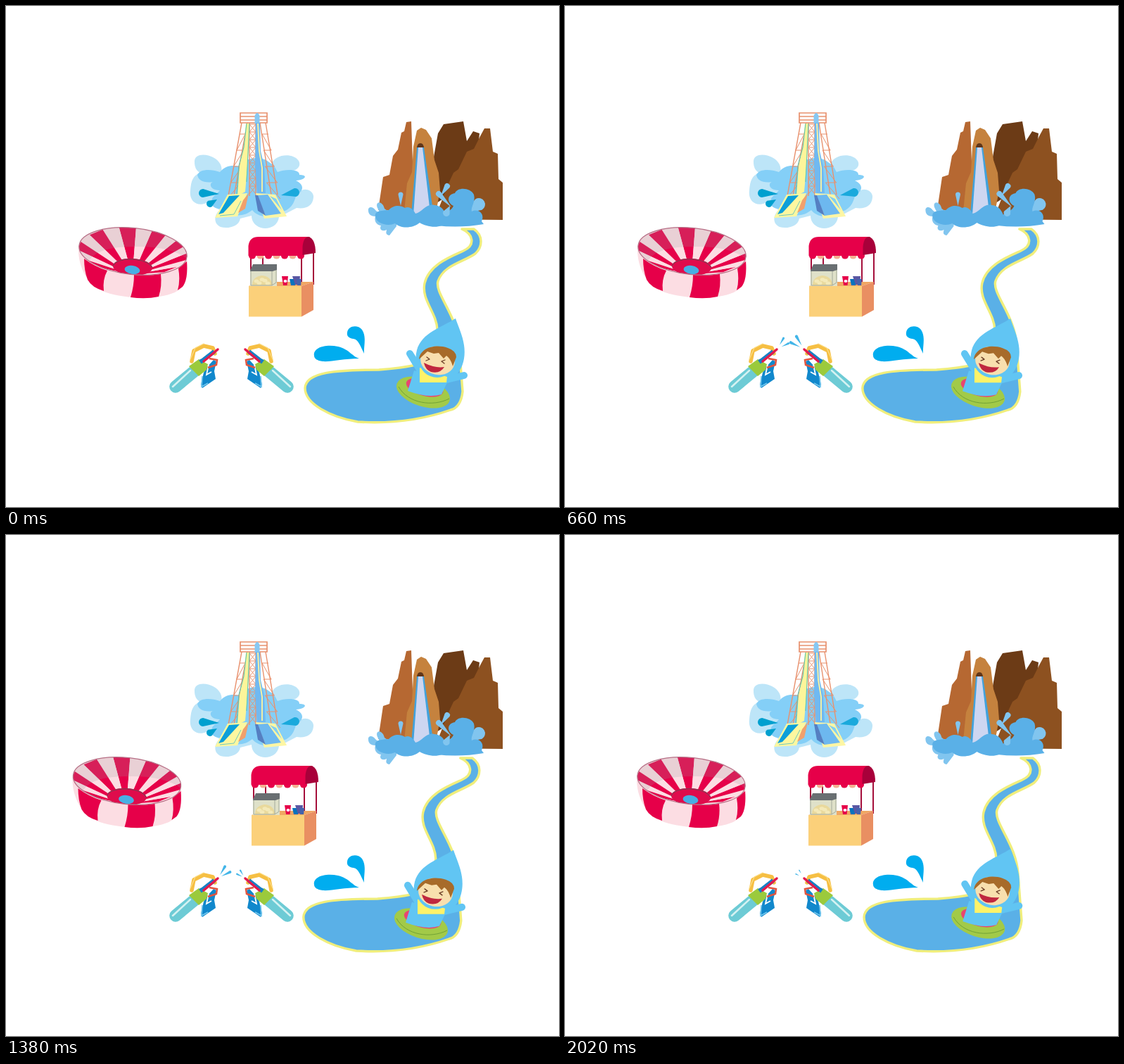
Write an HTML page that moves like this. It is 786x712 px and loops after 2050 ms.

```html
<!DOCTYPE html>
<html lang="en">
<head>
<meta charset="utf-8">
<title>Water park</title>
<style>
html, body { margin: 0; width: 100%; height: 100%; overflow: hidden; background: #fff; }
svg { display: block; }
</style>
</head>
<body>
<svg id="stage" width="786" height="712" viewBox="0 0 786 712"></svg>
<script>
const LOOP = 2050, TAU = Math.PI * 2;
const RED = '#e60049', PINK = '#fcdde3', WAVE = '#5ab0e7', FOAM = '#81c5ef', HOOD = '#61c5f3';
const round = 'stroke-linecap="round" stroke-linejoin="round"';

const path = (d, fill, more = '') => `<path d="${d}" fill="${fill}" ${more}/>`;
const line = (d, color, w = 1, more = '') => path(d, 'none', `stroke="${color}" stroke-width="${w}" ${more}`);
const poly = (points, fill) => `<polygon points="${points}" fill="${fill}"/>`;
const oval = (x, y, rx, ry, fill, turn = 0) =>
  `<ellipse cx="${x}" cy="${y}" rx="${rx}" ry="${ry}" fill="${fill}" transform="rotate(${turn} ${x} ${y})"/>`;
const box = (x, y, w, h, fill) => `<rect x="${x}" y="${y}" width="${w}" height="${h}" fill="${fill}"/>`;
const group = (id, body) => `<g id="${id}">${body}</g>`;
const repeat = (n, make) => Array.from({ length: n }, (_, i) => make(i)).join('');

// Teardrop with its point at (x, y) and its round end at (u, v)
function drop(x, y, u, v, w, fill) {
  const len = Math.hypot(u - x, v - y), nx = (y - v) / len * w, ny = (u - x) / len * w;
  const mx = x + (u - x) * .6, my = y + (v - y) * .6;
  return path(`M${x} ${y}Q${mx + nx * .6} ${my + ny * .6} ${u + nx} ${v + ny}` +
    `A${w} ${w} 0 0 0 ${u - nx} ${v - ny}Q${mx - nx * .6} ${my - ny * .6} ${x} ${y}Z`, fill);
}

const cloud = () =>
  path('M268 222C267 208 287 210 296 216C304 221 308 228 306 236H370L377 226C381 210 408 208 416 220C421 230 410 234 404 236L420 262C428 258 438 264 437 272C436 285 425 289 413 287L388 300C386 314 372 318 362 315C353 312 349 305 349 298L333 302C331 314 315 317 305 314C294 309 296 296 304 290L285 280C270 286 260 276 262 262C263 248 266 241 276 237C270 234 268 228 268 222Z', '#bde5f8') +
  path('M272 240C276 231 292 232 304 236C312 226 322 226 332 228C340 215 362 212 374 222C384 228 384 234 386 236C398 231 418 232 417 240C430 240 426 247 412 248C424 254 424 262 412 270C408 288 396 294 384 293C372 304 356 298 350 290C336 302 316 298 309 288C296 290 288 282 294 272L304 262C290 262 288 252 294 250C282 252 273 248 272 240Z', '#84cff7');

const cloudDrops = () =>
  drop(303, 267, 280, 266, 6, '#00a0cf') + drop(300, 275, 290, 281, 5, '#00a0cf') +
  drop(391, 269, 411, 265, 6, '#1aa9dc');

function slide() {
  const lattice = repeat(9, i => `M346 ${168 + i * 11}h9l-9 11m9 0l-9 -11`);
  const braces = repeat(4, i => {
    const y = 182 + i * 23, w = i * 4.3;
    return `M${332 - w} ${y}H${340 - w / 2}L${328 - w} ${y + 23}M${373 + w} ${y}H${364 + w / 2}L${377 + w} ${y + 23}`;
  });
  return line('M333 152H371V166H333ZM333 157H371M333 162H371', '#e8916e', 1.7) +
    line('M335 166L316 270M343 166L324 270M369 166L386 268M361 166L377 268M346 166V270M355 166V270', '#e8916e', 1.4) +
    line(lattice + braces, '#e8916e') +
    poly('341,167 346,167 345,205 340,264 329,270 332,228 338,200', '#fdf59a') +
    line('M342 167L338 201L331 227L328 268M346 167L342 250', '#5cc4ae', 1.1) +
    poly('315,268 343,266 329,299 297,301', '#fdf7a0') +
    poly('317,270 332,269 309,294 302,296', '#0b9fd9') +
    poly('337,276 345,266 340,288 330,294', '#f1a06c') +
    line('M304 298L324 296L334 277', '#63c2bf', .9) +
    path('M353.500 167V156Q357 148 360.500 156V167Z', '#86c8f3') +
    poly('355,166 361,166 362,206 367,228 369,266 357,268 354,225', '#70b9f1') +
    line('M358 167L360 206L364 230V264', '#fdf4a0', 1.8) +
    poly('355,266 383,268 399,299 367,302', '#fdf6a4') +
    poly('357,269 372,268 391,295 369,298', '#6db8ef') + poly('354,269 358,269 369,298 358,291', '#557fc2') +
    poly('375,270 384,274 392,290', '#82cff2');
}

const mountains = () =>
  poly('607,220 614,181 622,168 650,164 655,192 664,178 673,181 671,200 640,262 612,280', '#6c3b16') +
  poly('609,303 629,252 636,237 643,232 655,207 665,203 674,185 680,174 688,174 692,207 699,210 700,246 706,251 706,304', '#8d5120') +
  poly('529,290 536,243 545,240 550,213 557,204 562,180 566,178 569,165 576,164 579,250 568,291', '#b66832') +
  poly('566,292 570,252 577,236 579,200 584,177 590,173 597,176 605,188 609,219 615,237 617,262 611,294', '#c5823e') +
  path('M584 203Q584 195 589 195Q594 195 594 203Z', '#60361a') +
  poly('584,201 594,201 607,291 576,296', '#42a2dc') + poly('586,201 592,201 603,294 579,297', '#cdd6f1');

const splashLeft = () =>
  path('M515 291C514 285 521 284 525 290L533 297L528 287C524 277 535 276 538 288L555 300V313L545 326C538 325 541 320 541 318C535 321 530 318 533 312C526 311 523 305 525 299C519 299 515 296 515 291Z', FOAM) +
  path('M525 299C524 291 532 291 544 290C551 282 561 283 567 287C573 284 578 288 582 295C592 293 597 280 609 283C622 284 626 296 628 306C618 318 598 314 588 308C577 317 560 316 553 309C542 314 526 309 525 299Z', WAVE) +
  drop(561, 284, 561, 268, 3.5, FOAM);

const splashRight = () =>
  drop(648, 296, 672, 282, 9, FOAM) +
  path('M612 305C614 296 632 294 636 284C627 280 626 268 638 266C642 257 660 258 665 268C668 278 660 286 662 292C672 287 681 296 676 306L679 310Q645 316 612 312Z', WAVE) +
  drop(618, 270, 627, 256, 4, FOAM) + drop(633, 286, 615, 267, 4, FOAM) + drop(631, 284, 626, 294, 5, FOAM);

const pool = () =>
  path('M648 317H665C678 326 678 342 667 352C650 364 622 368 614 391C609 409 642 440 644 482L649 548C647 566 640 572 632 574C592 588 548 594 500 591C460 584 425 565 425 543C426 520 470 517 530 517C570 514 595 508 607 502L613 460C612 435 590 418 595 394C601 368 632 356 650 348C668 340 664 324 648 317Z',
    WAVE, `stroke="#f0ee7c" stroke-width="3.4" ${round}`);

// Inflatable ring: stripes run from the rim down to the hole at equal angles
function tube() {
  const step = TAU / 20, start = TAU * 87 / 360;
  const at = (i, x, y, rx, ry) => {
    const a = start + i * step;
    return `${x + rx * Math.cos(a)},${y - ry * Math.sin(a)} `;
  };
  const rim = i => at(i, 181, 348, 80, 36), hole = i => at(i, 180, 371, 27, 11);
  const stripes = repeat(20, i => poly(rim(i) + rim(i + 1) + hole(i + 1) + hole(i), i % 2 ? PINK : RED));
  const bowl = `cx="180.500" cy="348.500" rx="77" ry="33" transform="rotate(6 180.500 348.500)"`;
  return `<clipPath id="bowl"><ellipse ${bowl}/></clipPath>` +
    path('M103 346C103 324 135 314 165 315C215 315 258 336 257.500 364C258 388 254 399 240 407C214 418 170 416 142 407C116 398 103 372 103 346Z', PINK) +
    path('M111 359Q127 371 144 376Q137 389 139 405Q122 400 116 389Q111 376 111 359Z', RED) +
    path('M182 382Q202 384 220 381Q222 398 217 413Q199 417 177 414Q182 398 182 382Z', RED) +
    path('M245 373L257 363Q259 389 251 399L244 404Q248 390 245 373Z', RED) +
    `<g clip-path="url(#bowl)">` + stripes +
    path('M90 300H270V372Q248 340 181 342Q130 342 118 362L90 350Z', '#9a9a9a', 'opacity=".2"') +
    oval(180, 371, 28, 12, '#df0c4c', 3) + line('M152 370C155 356 200 356 208 372', '#8d3450', 1.3) +
    oval(179.500, 375, 11, 6, '#48afe4', 8) + '</g>' +
    `<ellipse ${bowl} fill="none" stroke="#b76f86" stroke-width="1.2"/>`;
}

const stand = () =>
  line('M348 354V399M365 354V370M420 354V396M437 350V396', '#a50f3b', 2) +
  poly('345,398 362,392 437,392 420,398', '#f0a763') +
  poly('420,398 437,392 437,432 420,441.500', '#e98f62') + box(345, 398, 75, 43.500, '#fbd07a') +
  box(347, 375, 38, 23, '#dfe1c9') + path('M350 397Q350 385 363 383Q376 383 379 397Z', '#e9d99c') +
  repeat(5, i => oval(356 + i * 4, 391 + 3 * Math.sin(i * 2), 3.5, 2.5, '#f4e9b8')) +
  line('M348 376V397H378V376M378 397L384 393V374', '#a4aa9c') +
  poly('347,376 351,367 385,367 385,375 379,377 347,377', '#696f72') +
  poly('392,384 401,384 399.500,397 394,397', RED) + oval(397, 391, 2.500, 2, '#fff') +
  poly('403,388 412,388 411,397 405,397', '#0873bd') + poly('407,384 418,384 417,396 411,396', '#5a57a3') +
  poly('413,388 420,388 419,397 414,397', '#4463ad') +
  repeat(7, i => oval(350 + i * 11.5, 355, 5, 4.500, i % 2 ? '#f4b091' : RED)) +
  path('M344.500 355V341Q346 328 359 328H432L422 342V355Z', RED) +
  path('M421.500 354V342Q423 328 430 328Q440 331 440 351Z', '#a8003a');

const gun = () =>
  line('M264 505L267 490L281 483L294 486L297 494', '#f6bf43', 5.500, round) +
  line('M262 502L269 486L281 480', '#fbdc84', 1.300, round) +
  poly('284,515 295,503 299,505 296,519 298,530 279,543 277,538 281,521', '#1188cc') +
  line('M279 526L278 541L287 536', '#72c7ee', 1.700) + line('M288 510L285 524L292 520', '#fff', 1.800) +
  line('M241 541L270 517', '#6dcbd5', 17.500, round) + line('M237 541L262 518', '#d5f2f2', 2.500, round) +
  poly('260,512 274,502 287,509 285,517 274,526', '#9bca3c') +
  line('M276 506L296 491', '#1780c5', 6) + line('M281 505L301 488', '#e31a4d', 3.500, round) +
  line('M277 501L292 489', '#fff', 1.500) + line('M289 501L300 503L299 510L287 514', '#e2543f', 2.500);

const child = () =>
  path('M639 444C619 457 591 464 584 489C578 511 591 533 614 536C643 534 655 508 651 482C649 468 643 456 639 444Z', HOOD) +
  oval(593, 549, 39.500, 20, '#a2ca48', 18) + line('M558 541C571 565 607 570 630 558', '#71a237') +
  oval(595, 542, 27, 12, '#e94670', 15) +
  path('M580 518L629 531L619 552Q600 558 571 547Z', HOOD) +
  line('M590 520L574 494M622 532L651 525', HOOD, 10, round) +
  poly('588,514 627,527 626,535 588,535', '#fdf269') +
  oval(613, 503, 26, 25, HOOD) + oval(613.500, 504, 24.500, 20, '#f8dfae', 12) +
  path('M587 502C589 485 611 480 628 486Q640 490 640 499L635 512Q632 501 626 497L622 501L615 493L608 494L599 491Z', '#a76b2a') +
  line('M598 499L602 502L597 504M624 503L619 505L623 508', '#693b24', 1.300, round) +
  path('M594 507Q609 515 623 513Q617 523 604 520Q596 517 594 507Z', '#c0273f');

const puddleDrops =
  path('M438 497C436 485 455 480 472 484C488 488 492 498 502 501C480 501 462 506 450 505C442 504 438 501 438 497Z', '#00adef') +
  path('M485 464C486 455 499 452 506 460C513 470 508 485 509 494C504 484 501 474 494 473C488 472 484 470 485 464Z', '#00adef');

// Two drops that leave the nozzle, grow and shrink again as q runs from 0 to 1
function jet(q) {
  if (q <= 0 || q >= 1) return '';
  const size = Math.sin(q * Math.PI), near = 3 + 4 * q, far = near + 4 + 11 * size;
  const one = angle => {
    const c = Math.cos(angle), s = Math.sin(angle);
    return drop(302 + near * c, 487 - near * s, 302 + far * c, 487 - far * s, .6 + 1.5 * size, '#43b5e8');
  };
  return one(TAU / 6) + one(TAU / 14);
}

const mirror = (body, id = '') => `<g transform="matrix(-1 0 0 1 641 0)" id="${id}">${body}</g>`;
const stage = document.getElementById('stage');
stage.innerHTML =
  group('cloud', cloud()) + cloudDrops() + slide() + mountains() +
  group('left', splashLeft()) + group('right', splashRight()) + group('pool', pool()) +
  group('tube', tube()) + group('stand', stand()) +
  gun() + mirror(gun(), 'gunRight') + group('jetLeft', '') + mirror('', 'jetRight') +
  puddleDrops + group('child', child());

const el = id => document.getElementById(id);
const place = (id, transform) => el(id).setAttribute('transform', transform);
const move = (id, x, y = 0) => place(id, `translate(${x} ${y})`);

// Runs through evenly spaced poses over one loop
function along(poses, t) {
  const p = t / LOOP * (poses.length - 1), i = Math.floor(p);
  return poses[i] + (poses[i + 1] - poses[i]) * (p - i);
}

function draw(now) {
  const raw = now % LOOP, t = raw < 100 ? 0 : raw;
  const phase = period => t / period % 1;

  const swing = phase(547);
  const drift = swing < .25 ? 0 : swing < .56 ? -8.5 : -1;
  move('tube', drift, drift ? 1 : 0);

  move('stand', Math.round(4 * (1 - Math.abs(1 - 2 * phase(950)))));

  const swell = Math.cos(TAU * phase(LOOP / 3)) < 0 ? 1.1 : 1;
  place('cloud', `translate(350 211) scale(${swell}) translate(-350 -211)`);

  const spread = phase(1060) > .6 ? 2.5 : 0;
  move('left', -spread);
  move('right', spread);

  const burst = phase(LOOP / 2);
  el('jetLeft').innerHTML = jet((burst - .1) / .7);
  el('jetRight').innerHTML = jet((burst - .25) / .75);

  move('pool', -1.5 + 1.5 * Math.cos(TAU * phase(LOOP)));
  move('child', along([0, -6, -6, -2, -3, -3, -6], t), along([0, 2, 0, -1, 4, 1, 2], t));
}

function tick() {
  draw(performance.now());
  requestAnimationFrame(tick);
}
tick();
</script>
</body>
</html>
```
